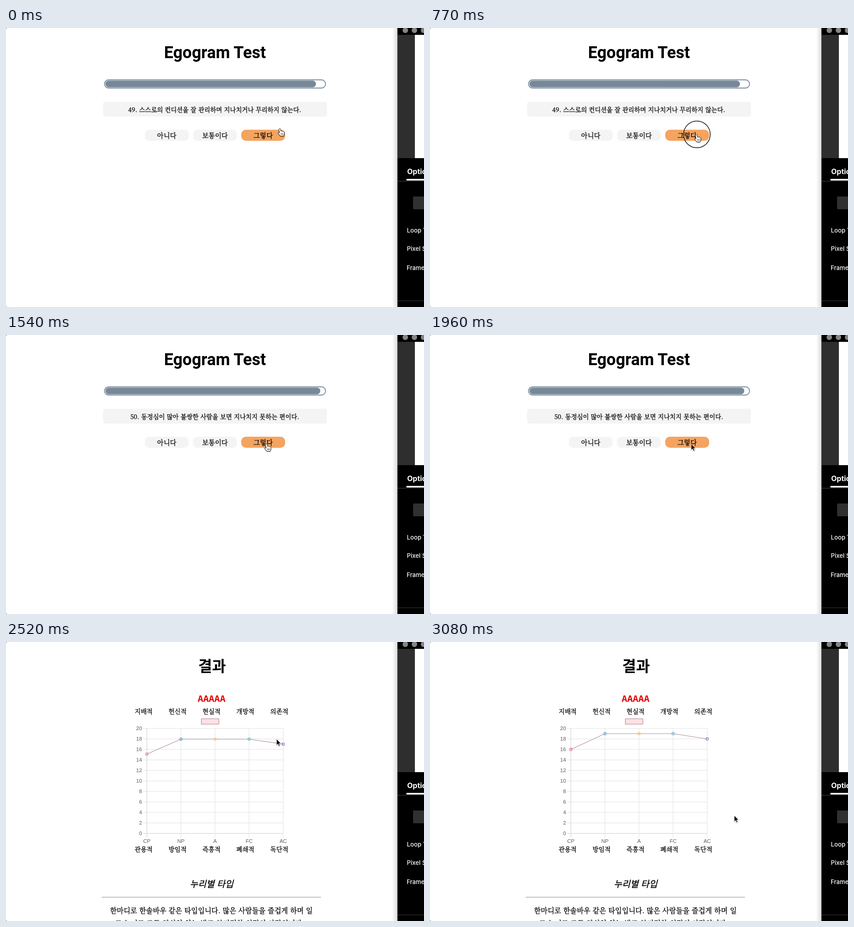
Recreate the animation shown at these times as an HTML page. Size 917 by 611 pixels, loop 3.15 s.

```html
<!DOCTYPE html>
<html lang="ko">
<head>
<meta charset="utf-8">
<title>Egogram Test</title>
<style>
html, body { margin: 0; width: 100%; height: 100%; overflow: hidden; background: #fff; }
svg { display: block; width: 917px; height: 611px; }
text { font-family: "Noto Serif CJK KR", "Noto Sans CJK KR", "Noto Sans CJK", serif; fill: #000; }
.mid { text-anchor: middle; }
.ink { stroke: #000; stroke-width: .35px; }
.title { font: 700 36px Roboto, sans-serif; }
.head { font: 900 33px "Noto Sans CJK KR", "Noto Sans CJK", sans-serif; }
.code { font: 800 20.4px "Noto Sans Mono", monospace; fill: #e80000; }
.type { font: italic 500 19.6px "Noto Sans CJK KR", "Noto Sans CJK", sans-serif; }
.axis { font: 11.6px "Liberation Sans", sans-serif; fill: #5c5c5c; }
.panel { font: 500 13.2px Inter, sans-serif; fill: #fff; }
</style>
</head>
<body>
<svg id="stage" viewBox="0 0 917 611"></svg>
<script>
const LOOP = 3150, STEP = 70;
const stage = document.getElementById('stage');

function add(parent, tag, attrs = {}, content) {
  const node = document.createElementNS('http://www.w3.org/2000/svg', tag);
  for (const key in attrs) node.setAttribute(key, attrs[key]);
  if (content !== undefined) node.textContent = content;
  return parent.appendChild(node);
}
const rect = (parent, x, y, width, height, fill, more = {}) =>
  add(parent, 'rect', { x, y, width, height, fill, ...more });
const label = (parent, x, y, content, cls, size) =>
  add(parent, 'text', { x, y, class: cls, ...(size && { 'font-size': size }) }, content);

// Quiz page
const quiz = add(stage, 'g');
label(quiz, 458.5, 66, 'Egogram Test', 'mid title');
rect(quiz, 216, 113.5, 485, 18, '#fff', { rx: 9, stroke: '#778899', 'stroke-width': 1.8 });
const progress = rect(quiz, 218, 115.2, 462, 14.6, '#778899', { rx: 7.3 });
rect(quiz, 213, 161.5, 491, 32.5, '#f4f4f4', { rx: 5 });
const question = label(quiz, 458, 183.5, '', 'mid ink', 13.5);
const buttons = ['아니다', '보통이다', '그렇다'].map((name, i) => {
  const x = 304.7 + i * 105.7;
  const box = rect(quiz, x, 222.7, 96.3, 24.3, '#f4f4f4', { rx: 10 });
  label(quiz, x + 48, 240.7, name, 'mid ink', 14.6);
  return box;
});

// Result page
const result = add(stage, 'g');
const colX = i => 309 + i * 74.8;
const valueY = v => 419.3 - v * 11.5;
const scores = [16, 19, 19, 19, 18];
const colors = ['#e0708a', '#5a9fcb', '#f2c879', '#72b0c4', '#8f70cc'];
label(result, 452, 64.8, '결과', 'mid head');
label(result, 451, 130.5, 'AAAAA', 'mid code');
['지배적', '헌신적', '현실적', '개방적', '의존적'].forEach((s, i) =>
  label(result, 302 + i * 74.4, 157.3, s, 'mid ink', 13.7));
['관용적', '방임적', '즉흥적', '폐쇄적', '독단적'].forEach((s, i) =>
  label(result, 302 + i * 74.4, 458.8, s, 'mid ink', 13.7));
rect(result, 428.5, 168, 38.5, 12, '#ffe0e6', { stroke: '#a97f88' });
for (let v = 0; v <= 20; v += 2) {
  rect(result, 301, valueY(v) - .7, 307.5, 1.4, v ? '#e8e8e8' : '#d9d9d9');
  add(result, 'text', { x: 298.5, y: valueY(v) + 4, class: 'axis', 'text-anchor': 'end' }, v);
}
['CP', 'NP', 'A', 'FC', 'AC'].forEach((s, i) => {
  rect(result, colX(i) - .7, 189, 1.4, 239, i ? '#e8e8e8' : '#d9d9d9');
  label(result, colX(i), 440.3, s, 'mid axis');
});
const line = add(result, 'polyline', { fill: 'none', stroke: '#b08a92', 'stroke-width': 1.1 });
const dots = colors.map((c, i) => add(result, 'circle', {
  cx: colX(i), r: 2.9, fill: c, 'fill-opacity': .15, stroke: c, 'stroke-width': 1.1
}));
label(result, 451, 536.5, '누리별 타입', 'mid type ink');
rect(result, 210, 558.3, 481, 1.2, '#999');
label(result, 450.5, 594.3, '한마디로 한솔바우 같은 타입입니다. 많은 사람들을 즐겁게 하며 일', 'mid ink', 15.4);
label(result, 447, 621.5, '도 놀이도 모두 열심히 하는 밝고 부지런한 성격의 사람입니다.', 'mid ink', 15.4);

// Window at the right
const shade = add(stage, 'linearGradient', { id: 'shade' });
add(shade, 'stop', { offset: 0, 'stop-color': '#fff' });
add(shade, 'stop', { offset: 1, 'stop-color': '#dcdcdc' });
rect(stage, 847, 0, 12, 611, 'url(#shade)');
rect(stage, 858, 0, 1, 611, '#999');
rect(stage, 859, 0, 58, 611, '#000');
[876, 896, 916].forEach(cx => add(stage, 'circle', { cx, cy: 5, r: 6, fill: '#858585' }));
rect(stage, 859, 15, 38, 270, '#2e2e2e');
rect(stage, 897, 15, 20, 270, '#fff');
label(stage, 880, 320, 'Options', 'panel').style.cssText = 'font-size:16px;font-weight:700';
rect(stage, 878.5, 330.5, 39, 3.5, '#fff');
rect(stage, 859, 335, 58, 1, '#444');
rect(stage, 893, 369, 30, 28, '#303030', { rx: 2 });
label(stage, 879.5, 447.5, 'Loop Times', 'panel');
label(stage, 879.5, 488, 'Pixel Size', 'panel');
label(stage, 879, 530, 'Frame Rate', 'panel');
rect(stage, 859, 597, 58, 1, '#3a3a3a');
add(stage, 'path', { d: 'M0 0H2L0 2ZM0 611V609L2 611Z', fill: '#555' });

// Pointer
const ring = add(stage, 'circle', { r: 29.3, fill: 'none', stroke: '#111', 'stroke-width': 1.5 });
const pointer = add(stage, 'g', { style: 'filter:drop-shadow(0 1px 1px #0005)' });
const hand = add(pointer, 'g', { stroke: '#111', 'stroke-linejoin': 'round' });
add(hand, 'path', {
  fill: '#fff',
  d: 'M-1.8 9.8L-3.4 2.6C-3.9 .2-.5-.6 .2 1.8L1.3 6C2 5 3.4 5.2 3.8 6.3 4.6 5.5 6 5.8 6.3 6.9 7.5 6.4 8.6 7 8.7 8.6 9 12 8.4 14 7.2 16.6H-.2C-1.3 14.4-3.4 12.6-5 10.8-5.9 9.2-3.8 8-1.8 9.8Z'
});
add(hand, 'path', { d: 'M1.4 10.5V14M3.5 10.5V14M5.6 10.5V14', 'stroke-width': .8 });
const arrow = add(pointer, 'path', {
  d: 'M.5 .5V13.9L3.6 11.1 5.7 15.9 8 14.9 5.9 10.2H10Z', stroke: '#fff', 'stroke-width': .9
});

// Pointer stops: time, x, y
const route = [
  [0, 602, 220], [70, 602, 217], [140, 603, 218], [210, 602, 224], [350, 594, 242],
  [420, 590, 244], [560, 585.5, 233], [1050, 585.5, 233], [1540, 572.5, 238],
  [2380, 572.5, 238], [2450, 580, 226], [2520, 593, 212], [2590, 620, 205],
  [2660, 655, 207], [2730, 692, 224], [2800, 713, 252], [2870, 711, 284],
  [2940, 700, 311], [3080, 667, 379.5]
];
function pointerAt(t) {
  const i = route.findIndex(stop => stop[0] > t);
  if (i < 0) return route[route.length - 1].slice(1);
  const [a, b] = [route[i - 1], route[i]], k = (t - a[0]) / (b[0] - a[0]);
  return [a[1] + (b[1] - a[1]) * k, a[2] + (b[2] - a[2]) * k];
}
const show = (node, on) => node.setAttribute('display', on ? 'inline' : 'none');

function draw(now) {
  const t = Math.floor(now % LOOP / STEP) * STEP;
  const [x, y] = pointerAt(t);
  const done = t >= 2030, last = t >= 910;
  const hover = !done && y > 219;

  show(quiz, !done);
  show(result, done);
  progress.setAttribute('width', last ? 471.5 : 462);
  question.textContent = last
    ? '50. 동정심이 많아 불쌍한 사람을 보면 지나치지 못하는 편이다.'
    : '49. 스스로의 컨디션을 잘 관리하며 지나치거나 무리하지 않는다.';
  buttons[2].setAttribute('fill', hover ? '#f4a460' : '#f4f4f4');

  // Chart grows for one second, ease-out quart
  const grow = 1 - (1 - Math.min(1, Math.max(0, (t - 2004) / 1000))) ** 4;
  const heights = scores.map(s => valueY(s * grow));
  line.setAttribute('points', heights.map((h, i) => colX(i) + ',' + h).join(' '));
  dots.forEach((dot, i) => dot.setAttribute('cy', heights[i]));

  pointer.setAttribute('transform', `translate(${x} ${y})`);
  show(hand, hover && t < 1960);
  show(arrow, !hover || t >= 1960);
  show(ring, (t >= 770 && t < 910) || (t >= 1750 && t < 1890));
  ring.setAttribute('cx', x);
  ring.setAttribute('cy', y);
}

const start = performance.now();
function tick() {
  draw(performance.now() - start);
  requestAnimationFrame(tick);
}
tick();
</script>
</body>
</html>
```
